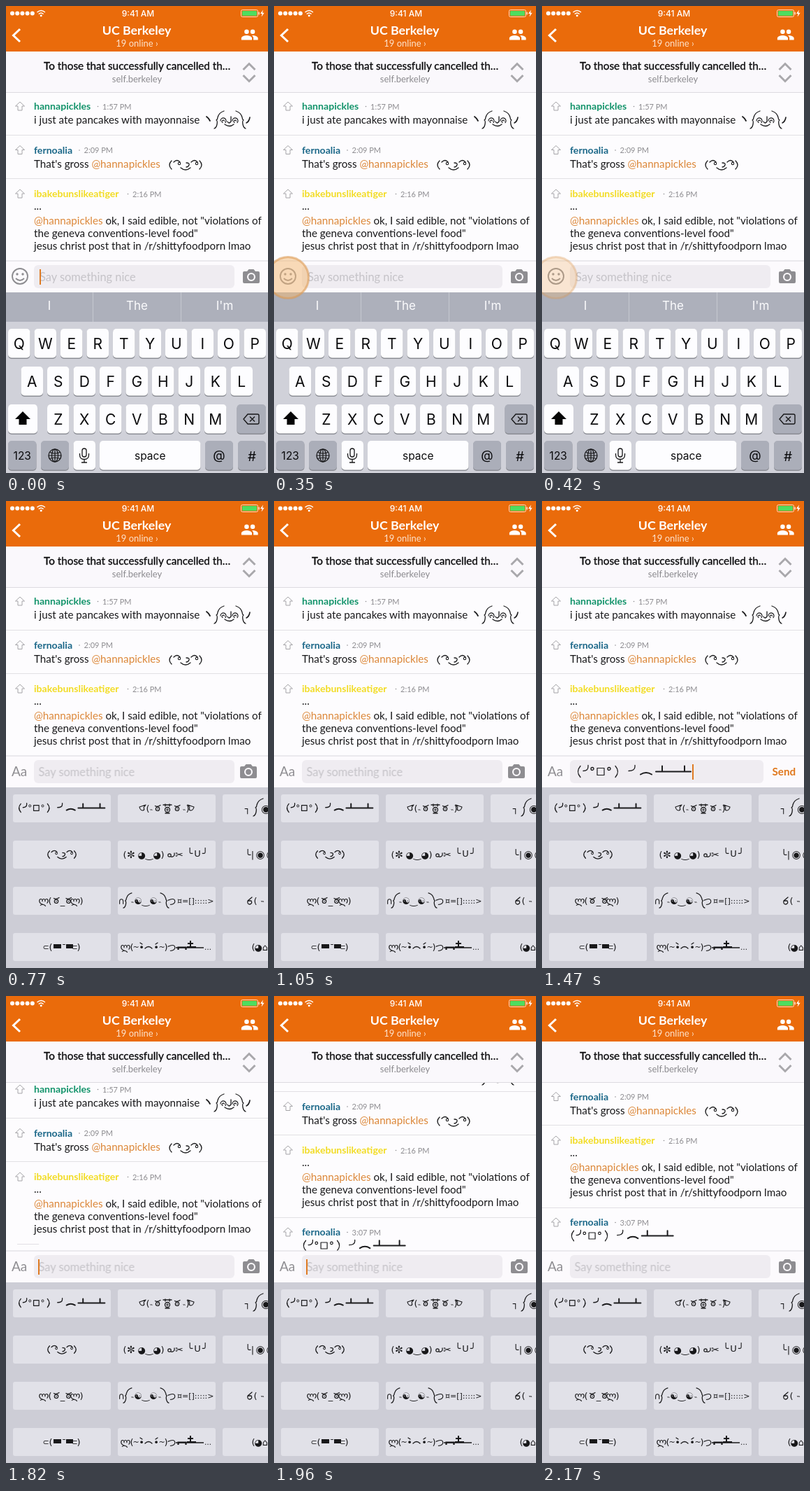
Animation, 375 px wide and 667 px high, one loop 2240 ms. Source, as an HTML page:

```html
<!DOCTYPE html>
<html lang="en">
<head>
<meta charset="utf-8">
<title>Chat with emoticon keyboard</title>
<style>
html, body { margin: 0; width: 100%; height: 100%; overflow: hidden; background: #fdfcfe; }
svg { display: block; width: 100vw; height: 100vh; font-family: Lato, "Open Sans", sans-serif; }
text { white-space: pre; }
.sys { font-family: Inter, Roboto, sans-serif; }
.sym { font-family: "DejaVu Sans", "Noto Sans CJK JP", "Noto Sans CJK", sans-serif; }
.ink { fill: none; stroke: #1c1c1e; stroke-linecap: round; stroke-linejoin: round; vector-effect: non-scaling-stroke; }
.tap { transform-box: fill-box; transform-origin: center; opacity: 0; }
</style>
</head>
<body>
<svg id="stage" viewBox="0 0 375 667" preserveAspectRatio="none"></svg>
<script>
const LOOP = 2240, STEPS = 32;
const ORANGE = '#ea6b0b', GRAY = '#8e8d91', INK = '#18181a';
const GREEN = '#12936a', BLUE = '#1a6788', YELLOW = '#f2dc22', MENTION = '#dc8738';
const ANN = 'hannapickles', FERN = 'fernoalia', TIGER = 'ibakebunslikeatiger';

// Drawing helpers
const rect = (x, y, w, h, fill, r = 0) =>
  `<rect x="${x}" y="${y}" width="${w}" height="${h}" rx="${r}" fill="${fill}"/>`;
const txt = (x, y, size, s, fill = INK, more = '') =>
  `<text x="${x}" y="${y}" font-size="${size}" fill="${fill}" ${more}>${s}</text>`;
const mid = (x, y, size, s, fill, more = '') => txt(x, y, size, s, fill, 'text-anchor="middle" ' + more);
const line = (d, color, w = 1) => `<path d="${d}" fill="none" stroke="${color}" stroke-width="${w}"/>`;
const ink = (d, w = 1.3) => `<path class="ink" d="${d}" stroke-width="${w}"/>`;
const at = (x, y, body, s = 1) => `<g transform="translate(${x} ${y}) scale(${s})">${body}</g>`;
const flip = body => `<g transform="scale(-1 1)">${body}</g>`;
const group = (id, ...parts) => `<g id="${id}">${parts.join('')}</g>`;
const dot = (x, y, r, fill) => `<circle cx="${x}" cy="${y}" r="${r}" fill="${fill}"/>`;
const ring = (x, y, r, color, w) =>
  `<circle cx="${x}" cy="${y}" r="${r}" fill="none" stroke="${color}" stroke-width="${w}"/>`;
const mention = name => `<tspan fill="${MENTION}">@${name}</tspan>`;

// Emoticon parts
const syms = (y, ...list) =>
  list.map(([x, s, size = 13]) => mid(x, y + size * .36, size, s, INK, 'class="sym"')).join('');
const hook = ink('M7-13Q0-11-2-4Q-2-1-4 0Q-2 1-3 6Q-4 11-7 12');
const brow = ink('M-3.5-3.5q3 2 7.5-1') + ring(0, .8, 2.7, INK, 1.2) + dot(0, .8, .8, INK);
const arm = ink('M5-4L-4-1Q-3 4 1 4Q4 3 2 0Z', 1.2);
const swirl = ink('M-4 1A4 4 0 1 1 3 3.5M-1 3.5A1.8 1.8 0 1 1 1.5 1.2', 1.2);
const wink = ink('M-20-6q-6 6.500 0 12M20-6q6 6 0 12M-17-4q5-5 9 0M8-4q5-5 9 0M-7 4q7 6 14 0'.replace('6.500', '6'), 1.3) +
  ink('M1-3q5 0 4 3t-4 3') + ring(-9, -2, 1.7, INK, 1.1) + ring(16, -2, 1.7, INK, 1.1);
const lift = at(-14, 0, hook) + at(17, 0, flip(hook)) + at(-8, 0, swirl) + at(9, 0, swirl) +
  ink('M3-5v7q-3 4-5 0M-6 6q7 5 13 0') + ink('M-32-5q3 2 5 6', 1.8) + ink('M30-4q-1 6-5 8', 1.6);
const flipTable = ink('M5-8q-7 8 0 16M55-8q7 8 0 16') +
  ink('M16-9v2q0 6-7 6M83-9v2q0 6-9 6') + ink('M29-5h10v10h-10z', 1.2) +
  ring(22, -4, 2, INK, 1.3) + ring(46, -4, 2, INK, 1.3) +
  ink('M91 4q8-5 16 0', 2) + ink('M113 0h50M122 0v-8M154 0v-8', 2);

// Chat list
const upArrow = y => at(20, y, line('M0-6L6.5 0H3V6H-3V0H-6.5Z', '#a5a4a8', 1));
const message = (y, name, color, stamp, dotX, ...lines) => upArrow(y - 5) +
  txt(40, y, 14.1, name, color, 'font-weight="700"') +
  dot(dotX, y - 4.5, .8, GRAY) + txt(dotX + 6.5, y - .5, 11, stamp, GRAY) +
  lines.map(([dy, s]) => txt(40, y + dy, 15.2, s)).join('');
const rule = y => rect(0, y, 375, 1, '#e2e0e4');

const list = group('list',
  message(148, ANN, GREEN, '1:57 PM', 131.5, [20, 'i just ate pancakes with mayonnaise']),
  at(319, 163, lift), rule(184),
  message(210.5, FERN, BLUE, '2:09 PM', 105, [20.5, `That's gross ${mention(ANN)}`]),
  at(257, 227, wink), rule(246),
  message(273, TIGER, YELLOW, '2:16 PM', 174.5, [18, '...'],
    [39, `${mention(ANN)} ok, I said edible, not "violations of`],
    [57, 'the geneva conventions-level food"'],
    [75, 'jesus christ post that in /r/shittyfoodporn lmao']),
  group('newRule', rule(364)),
  message(390, FERN, BLUE, '3:07 PM', 105),
  at(41, 404.5, flipTable, .9));

// Header
const people = 'M16 11a3 3 0 1 0 0-6a3 3 0 0 0 0 6zM8 11a3 3 0 1 0 0-6a3 3 0 0 0 0 6z' +
  'M8 13c-2.3 0-7 1.2-7 3.5V19h14v-2.5c0-2.3-4.7-3.5-7-3.5z' +
  'M16 13l-1 .1c1.2.8 2 1.9 2 3.4V19h6v-2.5c0-2.3-4.7-3.5-7-3.5z';
const header = rect(0, 64, 375, 59, '#faf8fc') + rect(0, 123, 375, 1, '#dddbe0') +
  rect(0, 0, 375, 65, ORANGE) +
  [9, 16.2, 23.4, 30.6, 37.8].map(x => dot(x, 10.5, 3, '#fff')).join('') +
  line('M44.5 9q5.7-5 11.4 0M46.8 11.5q3.4-3 6.8 0', '#fff', 1.6) + dot(50.2, 13.8, 1.5, '#fff') +
  mid(189, 14.5, 12, '9:41 AM', '#fff', 'class="sys" font-weight="500"') +
  `<rect x="336.5" y="5.5" width="24" height="10" rx="2" fill="none" stroke="#fbd9bd"/>` +
  rect(338, 7, 21, 7, '#4fdc5f', 1) + rect(361.5, 8.5, 1.5, 4, '#fbd9bd', .7) +
  `<path d="M368 5.5l-4 5.5h2.6l-1 4.5l4-5.8h-2.6z" fill="#fff"/>` +
  line('M20 33L10.5 42L20 51', '#fff', 3) +
  mid(187, 41, 17.8, 'UC Berkeley', '#fff', 'font-weight="700"') +
  mid(187.5, 58, 13, '19 online ›', '#fde3cd') +
  at(335.8, 28, `<path d="${people}" fill="#fff"/>`, 1.08) +
  txt(54, 91, 15.3, 'To those that successfully cancelled th…', '#0c0c0e', 'stroke="#0c0c0e" stroke-width=".35"') +
  mid(187.5, 109, 13, 'self.berkeley', '#8b8a8e') +
  line('M339.5 91L348 82.5L356.5 91M339.5 99L348 107.5L356.5 99', '#a9a8ac', 3);

// Input bar
const FIELD = '#efecf1';
const camera = `<path fill-rule="evenodd" fill="${GRAY}" d="M341 379h4l2.5-3h7l2.5 3h4q2 0 2 2v13q0 2-2 2h-20q-2 0-2-2v-13q0-2 2-2z` +
  `M351 381a6 6 0 1 0 0 12a6 6 0 1 0 0-12z"/>` + dot(351, 387, 3.9, GRAY);
const smiley = ring(20, 386, 11, GRAY, 1.9) + dot(16, 383, 1.7, GRAY) + dot(24, 383, 1.7, GRAY) +
  line('M14 389q6 6 12 0', GRAY, 1.8);
const inputBar = rect(0, 364, 375, 45, '#fcfafd') + rect(0, 363.5, 375, 1, '#dad8dd') +
  group('idle', rect(40, 370, 287, 33, FIELD, 6), group('camera', camera),
    group('hint', txt(48, 393, 16.4, 'Say something nice', '#c5c3c8'))) +
  group('typed', rect(40, 370, 277, 33, FIELD, 6), at(50, 386.5, flipTable),
    txt(329.5, 392, 15.2, 'Send', '#e0781d', 'font-weight="700"')) +
  group('caretPos', group('caret', rect(48, 376, 2, 22, '#df7a22'))) +
  group('face', smiley) + group('letters', txt(8, 392.5, 19, 'Aa', GRAY));

// Letter keyboard
const DARK = '#abaeb9';
const key = (x, y, w, label = '', fill = '#fdfdff', size = 21) =>
  rect(x, y + 1, w, 42, '#8b8d94', 5) + rect(x, y, w, 41.5, fill, 5) +
  mid(x + w / 2, y + (size > 18 ? 29 : 26.5), size, label, '#0b0b0d', 'class="sys"');
const keyRow = (x, y, s) => [...s].map((c, i) => key(x + i * 37.5, y, 31.5, c)).join('');
const globe = ring(70, 642, 9, INK, 1.3) +
  `<ellipse cx="70" cy="642" rx="4.5" ry="9" fill="none" stroke="${INK}" stroke-width="1.2"/>` +
  line('M61 642H79M70 633V651M62.5 637.5q7.5 3 15 0M62.5 646.5q7.5-3 15 0', INK, 1.2);
const mic = `<rect x="109" y="632" width="6" height="12" rx="3" fill="none" stroke="${INK}" stroke-width="1.3"/>` +
  line('M105.5 639v2q0 6.5 6.5 6.5t6.5-6.5v-2M112 648v4M108 652h8', INK, 1.3);
const suggestions = rect(0, 409, 375, 42, '#adb0bb') +
  rect(124, 409, 1, 42, '#c6c8d0') + rect(250, 409, 1, 42, '#c6c8d0') +
  [[62, 'I'], [187.5, 'The'], [313, "I'm"]]
    .map(([x, s]) => mid(x, 434, 17, s, '#fbfbfd', 'class="sys"')).join('');
const keyboard = group('keyboard', rect(0, 409, 375, 258, '#d0d1d9'), suggestions,
  keyRow(3, 461, 'QWERTYUIOP'), keyRow(21.5, 515, 'ASDFGHJKL'), keyRow(59, 569, 'ZXCVBNM'),
  key(3, 569, 42), `<path d="M24 579l11 11h-5.5v8h-11v-8h-5.5z" fill="#050506"/>`,
  key(330.5, 569, 41.5, '', DARK),
  line('M346 583h14q2 0 2 2v10q0 2-2 2h-14l-6-7zM349 586.5l7 7M356 586.5l-7 7', INK, 1.4),
  key(3, 621, 40.5, '123', DARK, 15.5), key(50, 621, 40, '', DARK), globe,
  key(96.5, 621, 31.5), mic, key(134, 621, 144.5, 'space', '#fdfdff', 15.5),
  key(285, 621, 40, '@', DARK, 18), key(332, 621, 40, '#', DARK, 19));

// Emoticon panel
const cells = [419, 485, 551, 617]
  .map(y => [10, 160, 310].map(x => rect(x, y, 140, 40, '#e1e1e8', 3)).join('')).join('');
const gun = line('M243 638h40', INK, 1.5) +
  line('M246.5 641v-3.500h11v3.500'.replaceAll('.500', '.5'), INK, 2.2) +
  line('M259 637h13M264 637v-9M260 632h8', INK, 2);
const panel = group('panel', rect(0, 409, 375, 258, '#cdcdd6'), cells,
  at(17.5, 438.5, flipTable, .76),
  at(195, 438, arm), at(217, 439, brow), at(245, 439, brow), at(265, 438, flip(arm)),
  ring(231, 441, 3.5, INK, 1.3), ring(231, 441, 1.2, INK, 1),
  ink('M225 434h12M228 436v-3M234 436v-3M228 446h6'),
  syms(439, [203, '('], [208, '˵', 10], [255, '˵', 10], [260, ')'], [346, '┐'], [372, '◉', 16]),
  at(361, 438, hook),
  at(80, 505, wink, .88),
  syms(505, [170, '('], [179, '✼', 14], [194, '◕'], [205, '‿'], [216, '◕'], [224, ')'],
    [248, '✂', 14], [346, '╰', 14], [353, '|'], [364, '◉', 15], [379, '◉', 15]),
  syms(503, [263, '╰', 14], [274, 'U'], [285, '╯', 14]),
  ring(234, 506, 2.2, INK, 1.2), ink('M236 508q3 1 5-2v-3'),
  syms(571, [54, 'ლ', 14], [63, '('], [81, '_'], [99, 'ლ', 14], [108, ')'],
    [165, '∩'], [181, '˵', 10], [189, '☯'], [200, '‿'], [211, '☯'], [220, '˵', 10],
    [237, 'つ'], [357, '('], [367, '˵', 12]),
  at(72, 571, brow), at(89.5, 571, brow), at(174, 571, hook, .85), at(227, 571, flip(hook), .85),
  txt(245, 575, 11, '¤=[]:::::&gt;', INK, 'class="sym"'),
  ink('M352 566l-6 5q-1 5 3 5q4-1 2-5l-4 0'),
  syms(637, [57, '⊂', 11], [64, '('], [83, '¯'], [98, '⊂', 11], [104, ')'],
    [171, 'ლ', 14], [180, '('], [186, '~', 11], [194, '•'], [215, '•'], [223, '~', 11], [229, ')'],
    [237, 'つ'], [289, '…', 10], [354, '('], [361, '◕'], [371, '⌂']),
  rect(68, 633, 11, 6, INK), rect(86, 633, 10, 6, INK),
  ink('M192 631l3 2M217 631l-3 2M199 639q5-5 10 0'), gun);

const tap = (id, x, y) =>
  `<circle id="${id}" class="tap" cx="${x}" cy="${y}" r="29.5" fill="#f3b873" fill-opacity=".5" stroke="#dc9a52" stroke-opacity=".6" stroke-width="3"/>`;

document.getElementById('stage').innerHTML = list + header + inputBar + keyboard + panel +
  tap('tapFace', 20, 388) + tap('tapPick', 72.5, 443.5) + tap('tapSend', 346, 387);

// Motion: each table is [ms, value]; the picture advances in even steps
function play(id, prop, table, easing = 'step-end') {
  const frames = table.map(([ms, v]) => ({ offset: ms / LOOP, [prop]: v, easing }));
  frames.push({ offset: 1, [prop]: table[table.length - 1][1] });
  document.getElementById(id).animate(frames,
    { duration: LOOP, iterations: Infinity, easing: `steps(${STEPS})` });
}
const shift = (x, y = 0) => `translate(${x}px, ${y}px)`;

const SWAP = 490, PICK = 1330, SENT = 1750;
for (const id of ['keyboard', 'face']) play(id, 'opacity', [[0, 1], [SWAP, 0]]);
for (const id of ['panel', 'letters']) play(id, 'opacity', [[0, 0], [SWAP, 1]]);
play('idle', 'opacity', [[0, 1], [PICK, 0], [SENT, 1]]);
play('typed', 'opacity', [[0, 0], [PICK, 1], [SENT, 0]]);
play('hint', 'transform', [[0, shift(0)], [SWAP, shift(-1.5)]]);
play('camera', 'transform', [[0, shift(0)], [SWAP, shift(-4)], [SENT, shift(0)]]);
play('caret', 'opacity', [[0, 1], [140, .5], [210, 0], [1190, .3], [1260, .6], [PICK, 1], [2030, .5], [2100, 0]]);
play('caretPos', 'transform', [[0, shift(0)], [SWAP, shift(-2)], [PICK, shift(167)], [SENT, shift(-2)]]);

function playTap(id, peak) {
  play(id, 'opacity', [[0, 0], [peak - 140, 0], [peak - 70, .7], [peak, 1], [peak + 70, .6], [peak + 140, 0]], 'linear');
  play(id, 'transform', [[0, 'scale(1.3)'], [peak - 140, 'scale(1.3)'], [peak, 'scale(1)']], 'linear');
}
playTap('tapFace', 350);
playTap('tapPick', 1260);
playTap('tapSend', 1680);

play('list', 'transform', [[0, shift(0)], [SENT, shift(0)], [1820, shift(0, -10)], [1890, shift(0, -30)],
  [1960, shift(0, -48)], [2030, shift(0, -58)], [2100, shift(0, -62)]], 'linear');
const grow = (x, s) => `translateX(${x}px) scaleX(${s})`;
play('newRule', 'transform', [[0, grow(16, .083)], [1820, grow(16, .083)], [1960, grow(0, 1)]], 'linear');
</script>
</body>
</html>
```
